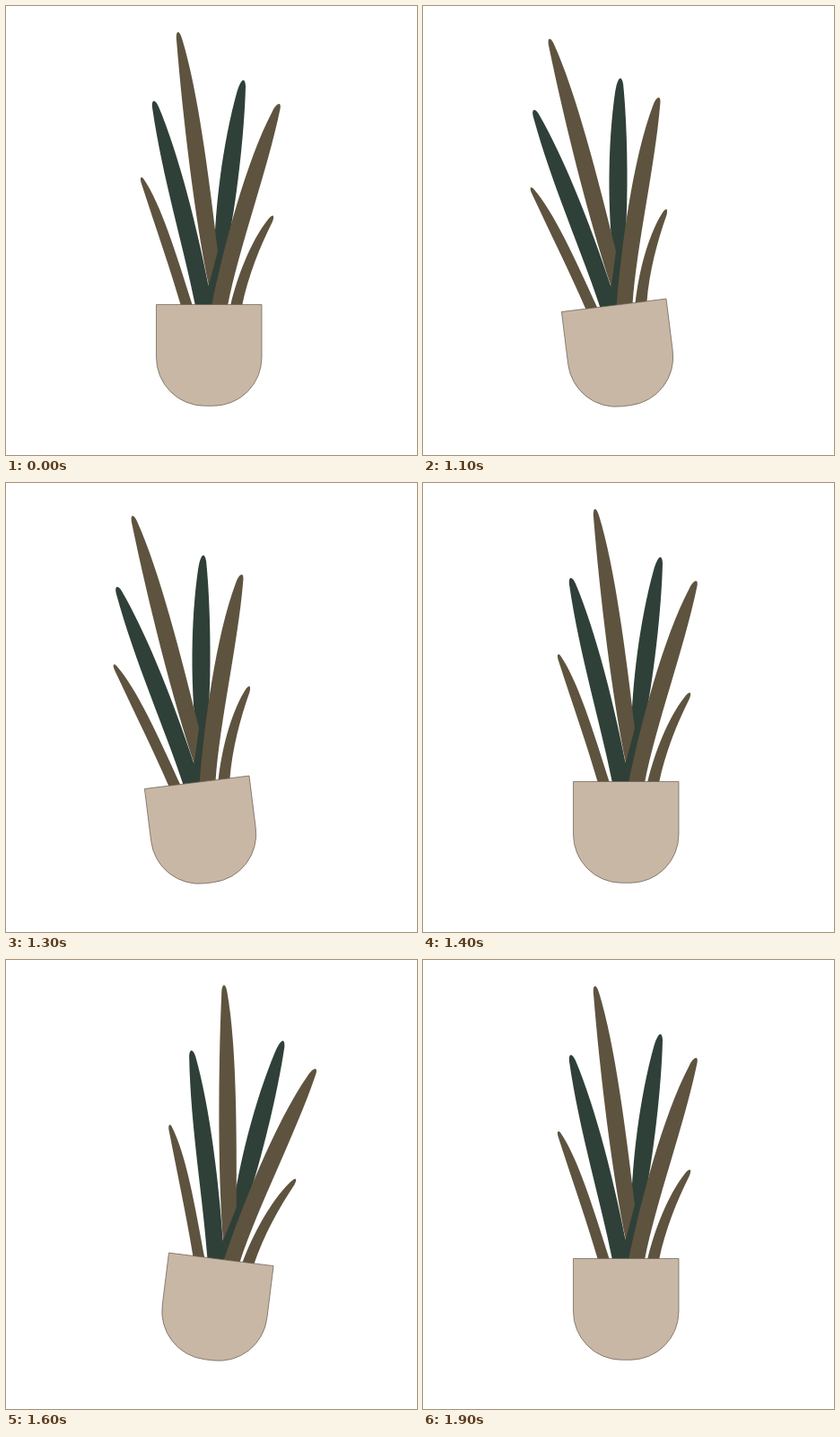
These frames come from a looping animation (458x500 px, 2 s). An HTML page:

```html
<!DOCTYPE html>
<html lang="en">
<head>
<meta charset="utf-8">
<title>Rocking plant</title>
<style>
  html, body { margin: 0; width: 100%; height: 100%; overflow: hidden; background: #fff; }
  svg { display: block; width: 458px; height: 500px; }
  .brown { fill: #5e533f; }
  .green { fill: #2f4038; }
  .pot { fill: #c9b7a5; stroke: #655d52; stroke-width: .7; }
  .dashes path { fill: none; stroke-linecap: round; }
  .edge { stroke: #75624f; stroke-width: 5.6; }
  .core { stroke: #a1866f; stroke-width: 4.4; }
</style>
</head>
<body>
<svg viewBox="0 0 458 500">
  <defs>
    <g id="dashes" class="dashes">
      <path class="edge" d="M118.500 447.500L144.500 438.500M134.500 478L155 461.500M173.500 494.500L181 471"/>
      <path class="core" d="M118.500 447.500L144.500 438.500M134.500 478L155 461.500M173.500 494.500L181 471"/>
    </g>
  </defs>
  <g id="plant">
    <path class="brown" d="M195 334C183 293 167 247 151 198C149 192 150 189 153 192C173 221 190 277 208 334Z"/>
    <path class="green" d="M232 275C233 225 241 155 257 97C261 83 266 77 267 89C266 137 257 220 246 270L236 290Z"/>
    <path class="brown" d="M226 312C211 240 197 125 190 38C189 27 193 26 196 36C214 94 226 190 236 273L229 312Z"/>
    <path class="green" d="M211 334C199 272 174 190 163 113C162 104 166 103 170 112C192 164 214 248 230 334Z"/>
    <path class="green" d="M236 273L248 262L231 334H216L227 307Z"/>
    <path class="brown" d="M229 334C242 271 267 174 297 117C302 107 308 106 305 117C291 184 260 268 247 334Z"/>
    <path class="brown" d="M250 334C258 300 273 262 291 239C297 231 300 232 297 240C283 268 270 300 263 334Z"/>
    <path class="pot" d="M167.500 332.500H285V391A54 54 0 0 1 231 445.300H221.500A54 54 0 0 1 167.500 391Z"/>
  </g>
  <use id="left" href="#dashes"/>
  <use id="right" href="#dashes" transform="translate(525 -50) scale(-1 1)"/>
</svg>
<script>
  const LOOP = 2000, REST = 1000, STEP = 100, UNIT = 3.55;
  // Tilt per step, in units; the dashes flash at each extreme.
  const tilts = [-1, -2, -3, -2, 0, 1, 2, 3, 2, 0];
  const get = id => document.getElementById(id);
  const plant = get('plant'), left = get('left'), right = get('right');
  const show = (el, on) => el.setAttribute('visibility', on ? 'visible' : 'hidden');

  function draw() {
    const t = performance.now() % LOOP;
    const tilt = t < REST ? 0 : tilts[Math.floor((t - REST) / STEP)];
    plant.setAttribute('transform', `rotate(${tilt * UNIT} 226 442)`);
    show(left, tilt === -3);
    show(right, tilt === 3);
    requestAnimationFrame(draw);
  }
  draw();
</script>
</body>
</html>
```
